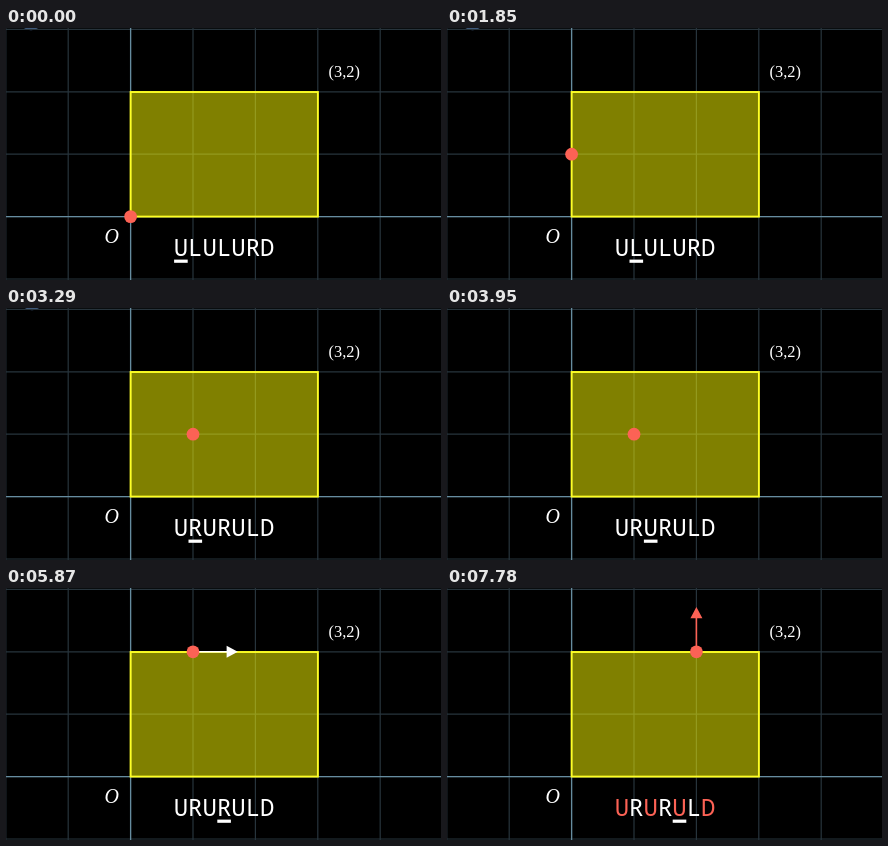
An HTML page that plays this animation: 435 by 252 pixels, repeating every 8 s.

```html
<!DOCTYPE html>
<html lang="en">
<head>
<meta charset="utf-8">
<title>Lattice walk</title>
<style>
html, body { margin: 0; width: 100%; height: 100%; overflow: hidden; background: #000; }
svg { display: block; width: 435px; height: 252px; }
.word { font: 24px "Noto Sans Mono", "DejaVu Sans Mono", monospace; }
.math { font: 16.4px "Liberation Serif", "Noto Serif", serif; fill: #fff; }
.origin { font-size: 20px; font-style: italic; }
</style>
</head>
<body>
<svg viewBox="0 0 435 252">
  <rect width="435" height="252" fill="#000"/>
  <circle id="mark" cx="25" cy="-10" r="12.3" fill="#46658f"/>
  <g id="grid"></g>
  <rect x="124.6" y="64" width="187.3" height="124.6" fill="#ff0" fill-opacity=".5" stroke="#ffff24" stroke-width="1.9"/>
  <g id="arrow">
    <line x1="0" x2="35" stroke-width="1.6"/>
    <path d="M44.8 0L33.6 -6V6Z" stroke="none"/>
  </g>
  <circle id="dot" r="6.4" fill="#fc6255"/>
  <text class="math" x="322.6" y="48.6">(3,2)</text>
  <text class="math origin" x="98.5" y="214.6">O</text>
  <g id="word" class="word"></g>
  <rect id="cursor" y="231.6" width="13.6" height="3.2" fill="#fff"/>
</svg>
<script>
const LOOP = 8000, UNIT = 62.4, RED = '#fc6255', WHITE = '#fff';
const ANGLE = { R: 0, D: 90, L: 180, U: -90 };
const $ = id => document.getElementById(id);
const px = x => 124.6 + x * UNIT;
const py = y => 188.6 - y * UNIT;

function add(parent, tag, attrs, text = '') {
  const el = document.createElementNS('http://www.w3.org/2000/svg', tag);
  for (const key in attrs) el.setAttribute(key, attrs[key]);
  el.textContent = text;
  parent.append(el);
  return el;
}

function gridLine(x1, y1, x2, y2, axis) {
  add($('grid'), 'line', {
    x1, y1, x2, y2,
    stroke: axis ? '#668c9f' : '#27343c',
    'stroke-width': axis ? 1.3 : 1.2
  });
}
for (let i = -2; i <= 4; i++) gridLine(px(i), 0, px(i), 252, false);
for (let j = -1; j <= 3; j++) gridLine(0, py(j), 435, py(j), false);
gridLine(px(0), 0, px(0), 252, true);
gridLine(0, py(0), 435, py(0), true);

const letters = [...'ULULURD'].map((c, i) =>
  add($('word'), 'text', { x: 167.7 + i * 14.4, y: 228.4 }, c));

// Each step lists only what changes at that time.
const steps = [
  { at: 0, word: 'ULULURD', pos: [0, 0], cursor: 0, dir: '', flip: '' },
  { at: 130, dir: 'U' },
  { at: 780, dir: '', pos: [0, 1] },
  { at: 1440, cursor: 1 },
  { at: 2040, dir: 'L', flip: 'LR' },
  { at: 2640, dir: 'R', flip: '', word: 'URURULD' },
  { at: 3290, dir: '', pos: [1, 1] },
  { at: 3950, cursor: 2 },
  { at: 4260, dir: 'U' },
  { at: 4910, dir: '', pos: [1, 2] },
  { at: 5570, cursor: 3 },
  { at: 5870, dir: 'R' },
  { at: 6530, dir: '', pos: [2, 2] },
  { at: 7180, cursor: 4 },
  { at: 7780, dir: 'U', flip: 'UD' }
];

function draw(t) {
  const s = Object.assign({}, ...steps.filter(step => step.at <= t));
  const x = px(s.pos[0]), y = py(s.pos[1]);
  $('dot').setAttribute('transform', `translate(${x} ${y})`);

  const arrow = $('arrow'), color = s.flip ? RED : WHITE;
  arrow.setAttribute('visibility', s.dir ? 'visible' : 'hidden');
  arrow.setAttribute('transform', `translate(${x} ${y}) rotate(${ANGLE[s.dir] || 0})`);
  arrow.setAttribute('fill', color);
  arrow.setAttribute('stroke', color);

  letters.forEach((el, i) => {
    const c = s.word[i];
    el.textContent = c;
    el.setAttribute('fill', s.flip.includes(c) ? RED : WHITE);
  });
  $('cursor').setAttribute('x', 168.1 + s.cursor * 14.4);

  const leave = Math.min(1, Math.max(0, (t - 3350) / 420));
  $('mark').setAttribute('transform', `translate(${t < 3350 ? t / 3350 : 1} ${-3 * leave})`);
  $('mark').setAttribute('opacity', 1 - leave);
}

const start = performance.now();
function tick() {
  draw((performance.now() - start) % LOOP);
  requestAnimationFrame(tick);
}
tick();
</script>
</body>
</html>
```
